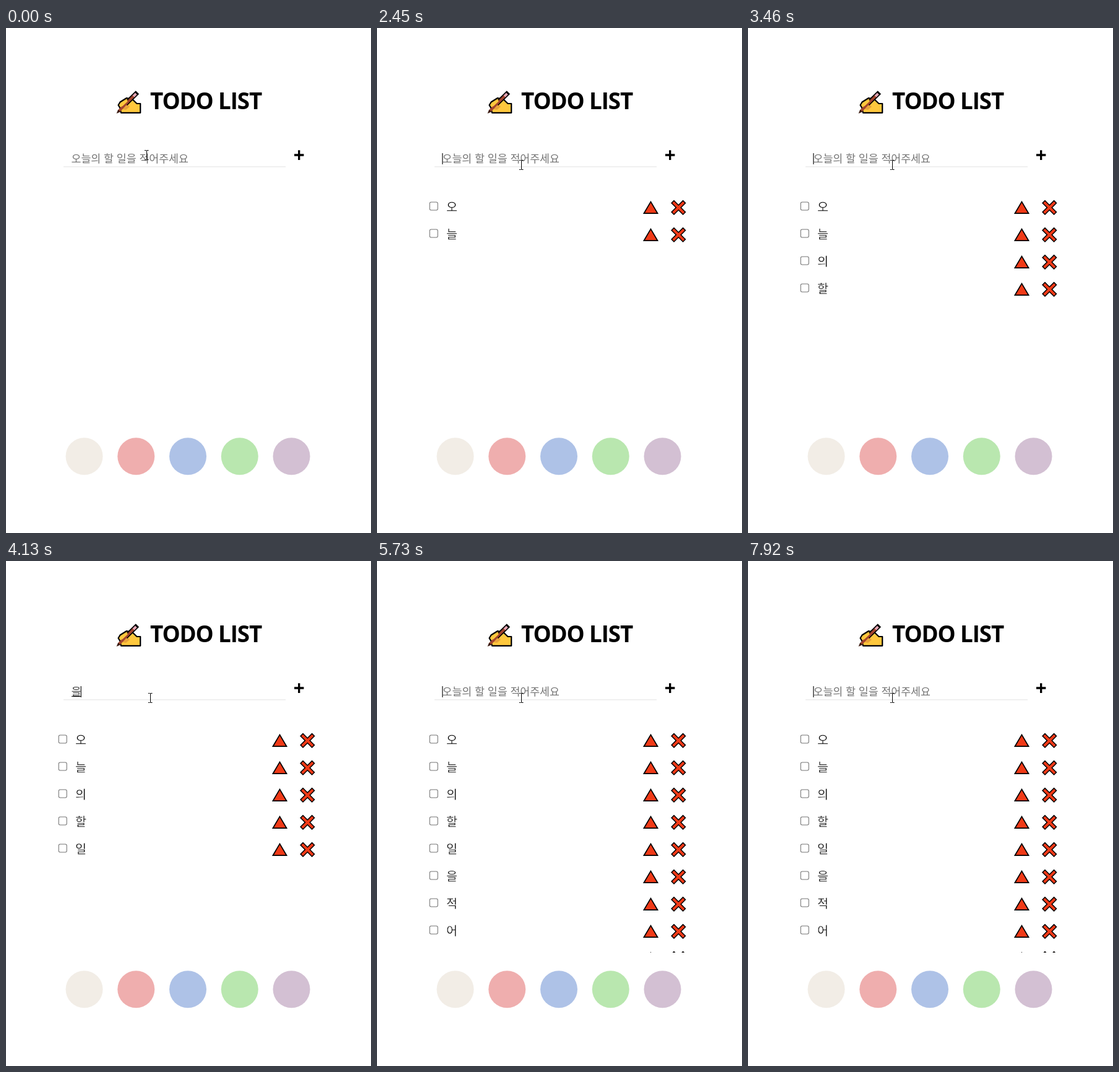
These frames come from a looping animation (590 by 815 pixels, 8 s). An HTML page:

```html
<!DOCTYPE html>
<html lang="ko">
<head>
<meta charset="utf-8">
<title>Todo list</title>
<style>
  html, body { margin: 0; width: 100%; height: 100%; overflow: hidden; background: #fff; }
  svg { display: block; width: 590px; height: 815px; }
  text { font: 300 17.3px "Noto Sans CJK KR", "Noto Sans CJK", sans-serif; white-space: pre; }
  .title { font: 700 36.7px "Open Sans", "Noto Sans", sans-serif; letter-spacing: -1.1px; }
  .item { font-size: 19.6px; }
  .item, #typed { stroke: #fff; stroke-width: .35px; }
</style>
</head>
<body>
<svg viewBox="0 0 590 815">
  <defs>
    <clipPath id="listArea"><rect y="240" width="590" height="392"/></clipPath>
    <path id="cross" d="M480 282.5 494.6 297.1M494.6 282.5 480 297.1" stroke-linecap="square"/>
    <g id="controls">
      <rect x="85.2" y="281" width="13" height="13" rx="2.4" fill="#fff" stroke="#767676" stroke-width="1.1"/>
      <path d="M442.5 280.4 453.6 299.2H431.4Z" fill="#f03a17" stroke="#000" stroke-width="1.7"/>
      <use href="#cross" stroke="#000" stroke-width="7"/>
      <use href="#cross" stroke="#f03a17" stroke-width="4"/>
    </g>
  </defs>

  <!-- writing hand -->
  <g stroke-linejoin="round">
    <path d="M186 136.8H217.2V122H211.5L204.5 115.3 195 113 184.5 119.5 181.5 124.5 184 128.5Z"
          fill="#ffc83d" stroke="#000" stroke-width="2.2"/>
    <path d="M188 131 197 124 200 127 194 132Z" fill="#e9a23b"/>
    <path d="M196 120 209.7 106.5" stroke="#000" stroke-width="7.6" stroke-linecap="square"/>
    <path d="M182.5 134 207 109.2" stroke="#a4452e" stroke-width="4"/>
    <path d="M206 110.2 210.3 106" stroke="#e3a6b5" stroke-width="4"/>
    <path d="M178.6 138 181.3 131.5 185 135.3Z" fill="#3b1a10"/>
    <path d="M183.5 123 192 117 196 115.5 196.5 118.5 188 126.5 184.5 126.5Z" fill="#ffc83d"/>
  </g>
  <text class="title" x="233" y="131">TODO LIST</text>

  <path d="M93 223.8H452" stroke="#eee" stroke-width="1.8"/>
  <path d="M466 205H481.4M473.7 197.2V213" stroke="#000" stroke-width="3.3"/>

  <text id="hint" x="105.5" y="216.5" fill="#757575">오늘의 할 일을 적어주세요</text>
  <g id="entry">
    <text id="typed" x="105.5" y="216.5"></text>
    <path d="M106 218.5H121" stroke="#000"/>
  </g>
  <rect id="caret" y="202" width="1.3" height="18" fill="#222"/>
  <g id="list" clip-path="url(#listArea)"></g>
  <g id="palette"></g>
  <path id="pointer" d="M-3 -7.5H-.5M.5 -7.5H3.5M.5 -7.5V7.5M-3 7.5H-.5M.5 7.5H3.5" stroke="#000" fill="none"/>
</svg>
<script>
const LOOP = 8000, BLINK = 530, ROW = 44;
const el = id => document.getElementById(id);

// [time, text being composed]; empty text means focus or Enter
const keys = [
  [330, ''], [990, 'ㅇ'], [1850, '오'], [1980, ''],
  [2180, 'ㄴ'], [2250, '느'], [2320, '늘'], [2450, ''],
  [2650, 'ㅇ'], [2720, '으'], [2790, '의'], [2860, ''],
  [3130, 'ㅎ'], [3200, '하'], [3330, '할'], [3460, ''],
  [3530, 'ㅇ'], [3600, '이'], [3730, '일'], [3860, ''],
  [3990, 'ㅇ'], [4060, '으'], [4130, '을'], [4260, ''],
  [4390, 'ㅈ'], [4460, '저'], [4590, '적'], [4790, ''],
  [5190, 'ㅇ'], [5260, '어'], [5330, ''],
  [5530, 'ㅈ'], [5590, '주'], [5730, ''],
  [6010, 'ㅅ'], [6080, '세'], [6210, ''],
  [6400, 'ㅇ'], [6530, '요'], [6860, '']
];
// [time, x, y] of the text pointer
const moves = [
  [0, 227, 205], [70, 227, 203], [130, 227, 201], [200, 229, 207],
  [260, 231, 214], [330, 233, 219], [530, 233, 221]
];

el('palette').innerHTML = ['#f2ede6', '#efaeae', '#aec2e7', '#b9e7af', '#d3c0d3']
  .map((c, i) => `<circle cx="${126.5 + i * 83.75}" cy="691.2" r="30" fill="${c}"/>`).join('');

el('list').innerHTML = [...'오늘의할일을적어주세요'].map((c, i) =>
  `<g transform="translate(0 ${i * ROW})"><use href="#controls"/><text class="item" x="112" y="295.5">${c}</text></g>`).join('');
const rows = [...el('list').children];

const show = (node, on) => node.setAttribute('visibility', on ? 'visible' : 'hidden');

function draw(now) {
  const t = now % LOOP;
  const past = keys.filter(k => k[0] <= t);
  const [since, text] = past.at(-1) || [Infinity, ''];
  const done = past.filter(k => !k[1]).length - 1;

  show(el('hint'), !text);
  show(el('entry'), text);
  el('typed').textContent = text;
  el('caret').setAttribute('x', text ? 120.6 : 105.2);
  show(el('caret'), t >= since && (t - since) % (2 * BLINK) < BLINK);
  rows.forEach((row, i) => show(row, i < done));

  const [, x, y] = moves.findLast(m => m[0] <= t);
  el('pointer').setAttribute('transform', `translate(${x} ${y})`);
}

const start = performance.now();
function frame() {
  draw(performance.now() - start);
  requestAnimationFrame(frame);
}
draw(0);
requestAnimationFrame(frame);
</script>
</body>
</html>
```
